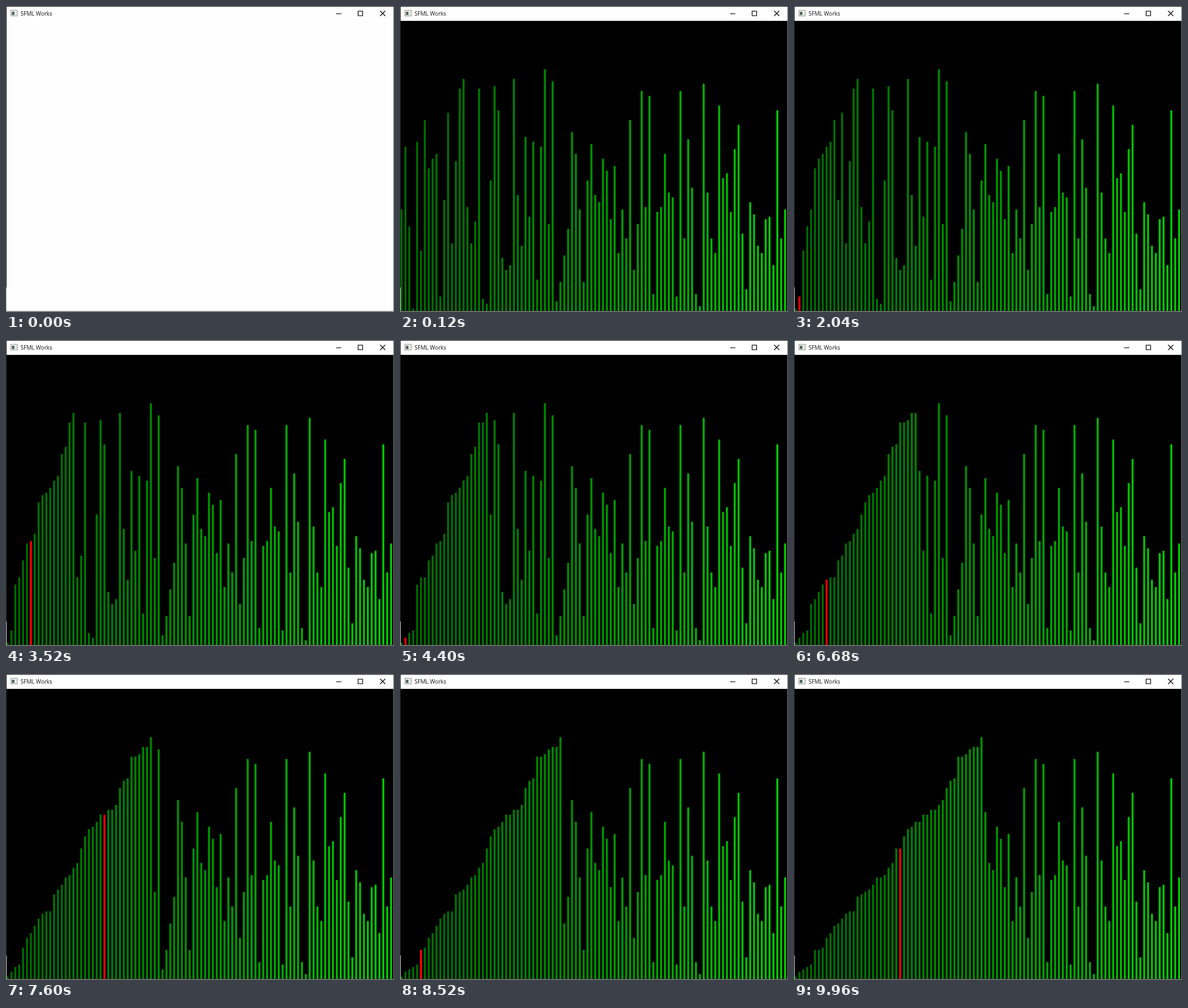
Recreate the animation shown at these times as an HTML page. Size 600 by 474 pixels, loop 10000 ms.

```html
<!DOCTYPE html>
<html lang="en">
<head>
<meta charset="utf-8">
<title>SFML Works</title>
<style>
  html, body { margin: 0; width: 100%; height: 100%; overflow: hidden; background: #fff; }
  svg { display: block; width: 600px; height: 474px; }
  text { font-family: "Open Sans", "Noto Sans", sans-serif; font-size: 8.6px; fill: #111; }
</style>
</head>
<body>
<svg viewBox="0 0 600 474" xmlns="http://www.w3.org/2000/svg">
  <rect width="600" height="474" fill="#fefdff"/>
  <g id="scene">
    <rect y="23" width="600" height="450" fill="#000"/>
    <g id="bars"></g>
  </g>
  <!-- window frame -->
  <rect width="600" height="1" fill="#222"/>
  <rect y="1" width="1" height="435" fill="#2b2b2b"/>
  <rect y="436" width="1" height="38" fill="#c4c4c4"/>
  <rect x="599" y="1" width="1" height="473" fill="#777"/>
  <rect y="472.5" width="600" height="1.5" fill="#7c7c7c"/>
  <!-- title bar -->
  <rect x="1" y="1" width="598" height="22" fill="#fff"/>
  <rect x="7.5" y="6.5" width="10" height="9" fill="#e6e9e6" stroke="#a5aaa5"/>
  <rect x="9" y="9" width="4" height="5" fill="#56685f"/>
  <text x="22.6" y="15">SFML Works</text>
  <g fill="none" stroke="#111" stroke-width="1.1">
    <path d="M510.5 12H518.5"/>
    <rect x="544.5" y="8" width="7" height="7"/>
    <path d="M578.5 7.5L586.5 15.5M586.5 7.5L578.5 15.5"/>
  </g>
</svg>
<script>
const COUNT = 100, LOOP = 10000, OPEN_AT = 80;
const BASE = 472.5, UNIT = 3.745, LEFT = 0.9, PITCH = 5.99, WIDTH = 3.1;

// Pace of the sort: [pass, time in ms], evenly spaced in between
const PACE = [
  [1, 120], [7, 1320], [8, 1640], [11, 2120], [13, 2680], [14, 2880], [17, 3520],
  [18, 3680], [20, 4160], [22, 4400], [23, 4840], [27, 5520], [28, 5720], [31, 6320],
  [32, 6720], [37, 7720], [41, 8360], [42, 8680], [46, 9320], [47, 9600], [48, 9800]
];

// The C runtime rand() with its default seed
let seed = 1;
function rand() {
  seed = (Math.imul(seed, 214013) + 2531011) >>> 0;
  return (seed >>> 16) & 0x7fff;
}

// Insertion sort, one state per pass; the mark stays on the last value moved
function sortStates(values, passes) {
  const list = values.slice();
  const states = [{ list: values, mark: -1 }];
  let mark = -1;
  for (let pass = 1; pass <= passes; pass++) {
    let at = pass;
    while (at > 0 && list[at - 1] > list[at]) {
      [list[at - 1], list[at]] = [list[at], list[at - 1]];
      at--;
    }
    if (at < pass) mark = at;
    states.push({ list: list.slice(), mark });
  }
  return states;
}

function passAt(t) {
  if (t < PACE[0][1]) return 0;
  for (let k = 1; k < PACE.length; k++) {
    const [p0, t0] = PACE[k - 1], [p1, t1] = PACE[k];
    if (t < t1) return Math.floor(p0 + (p1 - p0) * (t - t0) / (t1 - t0) + 1e-6);
  }
  return PACE[PACE.length - 1][0];
}

const start = Array.from({ length: COUNT }, () => rand() % 100 + 1);
const states = sortStates(start, PACE[PACE.length - 1][0]);
const scene = document.getElementById("scene");
const group = document.getElementById("bars");
const bars = start.map((_, i) => {
  const bar = document.createElementNS("http://www.w3.org/2000/svg", "rect");
  bar.setAttribute("x", LEFT + PITCH * i);
  bar.setAttribute("width", WIDTH);
  return group.appendChild(bar);
});

let shown = -1;
function render(t) {
  scene.style.display = t < OPEN_AT ? "none" : "";
  const pass = passAt(t);
  if (pass === shown) return;
  shown = pass;
  const { list, mark } = states[pass];
  bars.forEach((bar, i) => {
    const height = list[i] * UNIT;
    bar.setAttribute("y", BASE - height);
    bar.setAttribute("height", height);
    bar.setAttribute("fill", i === mark ? "#f00" : `rgb(0,${100 + i},0)`);
  });
}

const begin = performance.now();
function tick() {
  render((performance.now() - begin) % LOOP);
  requestAnimationFrame(tick);
}
tick();
</script>
</body>
</html>
```
